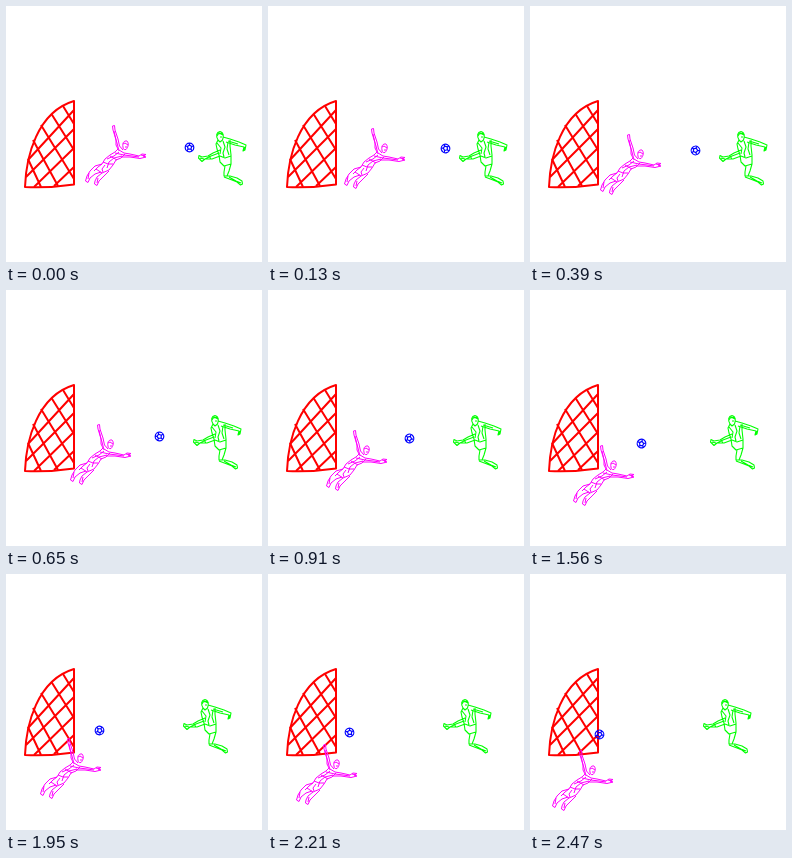
An HTML page with a canvas for the animation above (2600 ms loop, 256x256 px).

```html
<!DOCTYPE html>
<html lang="en">
<head>
<meta charset="utf-8">
<title>Penalty kick</title>
<style>
html, body { margin: 0; width: 100%; height: 100%; overflow: hidden; background: #fff; }
canvas { display: block; width: 256px; height: 256px; }
</style>
</head>
<body>
<canvas id="stage" width="256" height="256"></canvas>
<script>
const ctx = document.getElementById('stage').getContext('2d');
const STEP = 130, STEPS = 20;

const netEdge = new Path2D('M68 95 V178.5 Q45 182 19 181 C20 151 31 106 68 95Z');
const netMesh = new Path2D(`
  M57 100L68 118 M45.5 108L68 144 M35 119L68 173 M27 134L52 180 M22 153L35 181
  M68 104L22 154 M68 123L20 171 M68 142L28 181 M68 161L48 180`);

const keeper = new Path2D(`
  M113 145L111 137L107 124L106.5 120L108.5 119.5L109 124L112 133L113.5 140L117 144
  M108 125L110 134L110 139L112 143
  M117 141C116 137 118 134.5 121 135C123 137 122.5 141 120 143.5C118 144 117 143 117 141Z
  M117 138L119 137L122 139 M119 141L121 141
  M113 144L118 147L124 148L133 150L136 148L140 148.5L137 150L140 151L134 152.5L124 151L115 151
  M118 149L126 150L133 151 M135 149L139 150
  M112 143L109 146L104 149L99 153L96 158L92 161L88 165
  M119 148L115 152L110 154L107 159L103 164L96 167L90 163
  M113 146L108 150L101 153 M116 150L108 152L103 156L101 162
  M109 147L118 149 M104 150L111 154 M97 156L102 158L107 158
  M96 158L89 160L84 165L81 170L79.5 175L82 176.5L84 172L89 168L95 166
  M83 167L82 173 M96 167L91 171L89 175L88.5 178L91 179.5L93 175L98 170L103 165
  M92 172L91 177 M99 159L96 163L97 166`);

const kicker = new Path2D(`
  M212 134C209.5 130 210.5 126 214 125.5C217.5 126 218 130 216.5 134L214 136Z
  M211 130L213 127L217 129 M212 128L216 127 M214 131L216 131
  M217 131L224 133L233 136L240 139L239 144L237 145L238 141L229 139L220 136
  M222 135L232 138 M239 141L238 144
  M212 134L210 138L211 143L213 149L214 156L218 160L225 158L225 149L224 140L224 134
  M217 135L219 141L217 147L218 151 M222 136L221 143L223 149
  M211 137L215 142L214 148 M214 150L219 152L225 150
  M214 144L207 147L202 150L196 151L193 149.5L192.5 152L196 155.5L199 153L206 153L214 150
  M213 147L205 150L199 153 M194 152L198 153 M203 150L205 153
  M219 160L218 166L218 170L224 170L231 172L236 175L236.5 178L234.5 179L231 176L226 174L218 171
  M225 158L223 165L221 170 M223 171L230 175L235 177`);

const ballSeams = new Path2D(`
  M-2 -1L0 -2.5L2.2 -1L1.4 1.7L-1.4 1.7Z
  M0 -2.5V-4.3 M2.2 -1L4 -1.6 M1.4 1.7L2.6 3.4 M-1.4 1.7L-2.6 3.4 M-2 -1L-4 -1.6`);
const ballRim = new Path2D();
ballRim.arc(0, 0, 4.3, 0, Math.PI * 2);

function trace(color, width, x, y, turn, ...paths) {
  ctx.save();
  ctx.translate(x, y);
  ctx.rotate(turn);
  ctx.strokeStyle = color;
  ctx.lineWidth = width;
  for (const path of paths) ctx.stroke(path);
  ctx.restore();
}

function draw(now) {
  const n = Math.floor(now / STEP) % STEPS;
  ctx.fillStyle = '#fff';
  ctx.fillRect(0, 0, 256, 256);
  ctx.lineJoin = 'round';
  trace('#f00', 2, 0, 0, 0, netEdge, netMesh);
  trace('#0f0', 1.1, -n, 0, 0, kicker);
  trace('#f0f', 1, -3 * n, 3 * n, 0, keeper);
  trace('#00f', 1.2, 183.5 - 6 * n, 141.5 + n, -0.3 * n, ballRim, ballSeams);
}

const start = performance.now();
function tick() {
  draw(performance.now() - start);
  requestAnimationFrame(tick);
}
tick();
</script>
</body>
</html>
```
